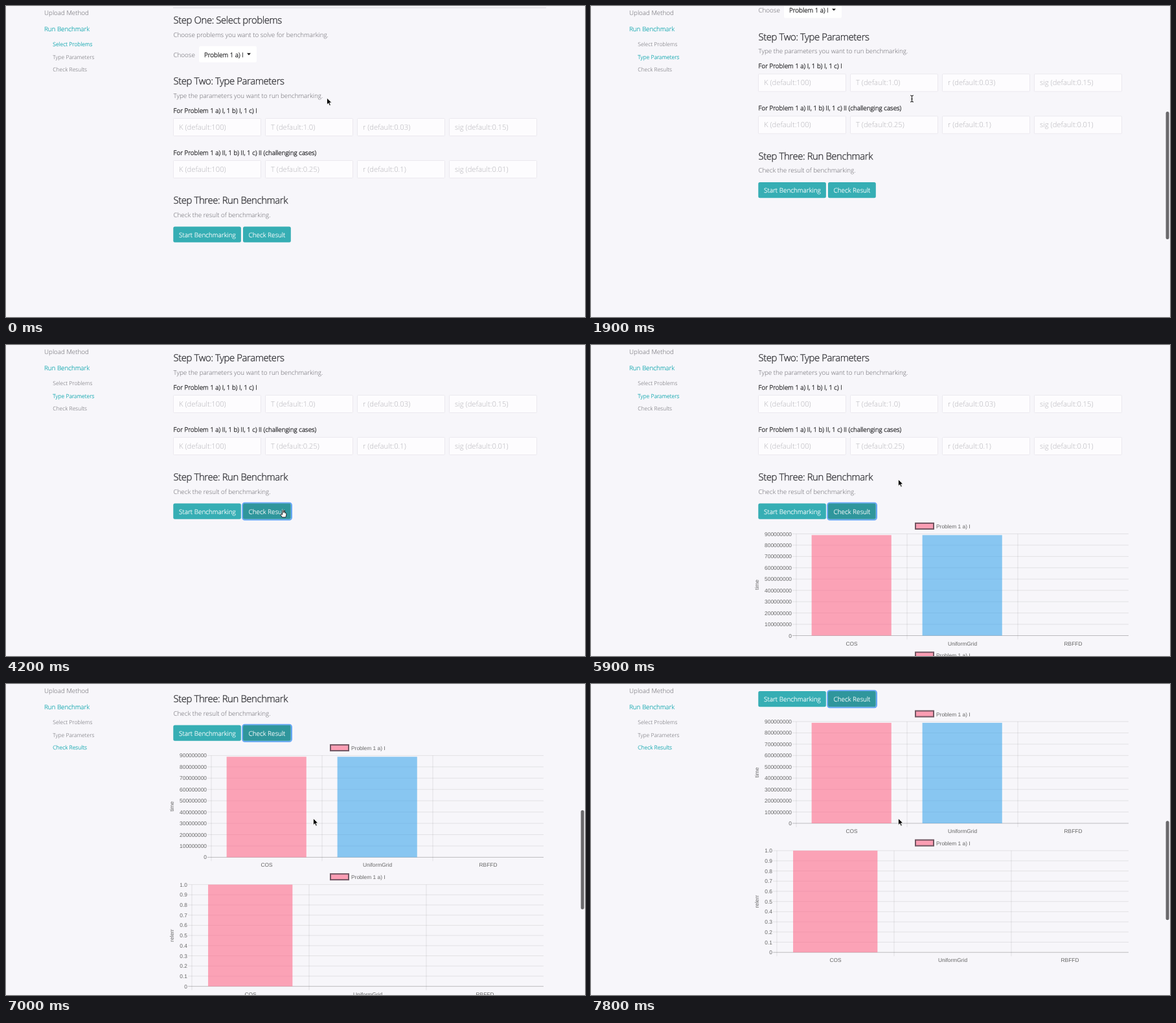
Animation, 894 px wide and 480 px high, one loop 8 s. Source, as an HTML page:

```html
<!DOCTYPE html>
<html lang="en">
<head>
<meta charset="utf-8">
<title>Run Benchmark</title>
<style>
  html, body { margin: 0; width: 100%; height: 100%; overflow: hidden; background: #f7f6fa; }
  svg { display: block; }
  text { font: 300 9.8px "Open Sans", sans-serif; fill: #626167; white-space: pre; text-rendering: geometricPrecision; }
  .head { font-size: 14.9px; letter-spacing: -.39px; fill: #2c2c30; stroke: #2c2c30; stroke-width: .3px; }
  .label { fill: #1a1a1c; stroke: #1a1a1c; stroke-width: .28px; }
  .hint { font-size: 11.25px; fill: #b6b5ba; }
  .sub { font-size: 8.5px; }
  .white { font-size: 9.93px; fill: #fff; stroke: #fff; stroke-width: .2px; }
  .on { fill: #1eabb3; stroke: #1eabb3; stroke-width: .2px; }
  .chart text { font: 400 8.4px "Liberation Sans", Arial, sans-serif; fill: #666; }
  .mid { text-anchor: middle; }
  .end { text-anchor: end; }
</style>
</head>
<body>
<svg id="stage" width="894" height="480" viewBox="0 0 894 480"></svg>
<script>
const PINK = '#ff6384', BLUE = '#36a2eb';
const text = (x, y, str, cls = '', extra = '') => `<text x="${x}" y="${y}" class="${cls}" ${extra}>${str}</text>`;
const rect = (x, y, w, h, fill, extra = '') =>
  `<rect x="${x}" y="${y}" width="${w}" height="${h}" fill="${fill}" ${extra}/>`;
const line = (x1, y1, x2, y2, alpha = .11) =>
  `<path d="M${x1} ${y1}L${x2} ${y2}" stroke="#000" stroke-opacity="${alpha}" stroke-width=".8"/>`;

const inputs = (y, hints) => hints.map((hint, i) =>
  rect(258.5 + i * 142, y + .5, 135, 27, '#fdfcfe', 'stroke="#ebe9ef" rx="1"') +
  text(267 + i * 142, y + 18, hint, 'hint')).join('');

const section = (y, title, note) => text(258.5, y, title, 'head') + text(258.5, y + 20.4, note);

// Bar chart whose plot area spans left..830 and top..top+157
function chart(top, left, ticks, title, bars) {
  const bottom = top + 157, step = (830 - left) / 3;
  let out = rect(501, top - 16.5, 28, 9, PINK, 'fill-opacity=".6" stroke="#735763" stroke-width="2"') +
    text(533, top - 8.5, 'Problem 1 a) I') +
    text(0, 0, title, 'mid', `transform="translate(258.5 ${top + 78.5}) rotate(-90)"`);
  ticks.forEach((tick, i) => {
    const y = top + i * 157 / (ticks.length - 1);
    out += line(left - 6, y, 830, y, tick === '0' ? .3 : .11) + text(left - 7, y + 3, tick, 'end');
  });
  ['COS', 'UniformGrid', 'RBFFD'].forEach((name, i) => {
    const x = left + i * step;
    out += line(x, top, x, bottom + 6) + text(x + step / 2, bottom + 15, name, 'mid');
    if (bars[i]) out += rect(x + step * .14 - .3, bottom, step * .72, 0, [PINK, BLUE][i],
      `fill-opacity=".57" class="bar" data-bottom="${bottom}" data-full="${bars[i] * 157}"`);
  });
  return out;
}

const millions = Array.from({ length: 10 }, (_, i) => i < 9 ? (9 - i) + '00000000' : '0');
const tenths = Array.from({ length: 11 }, (_, i) => i < 10 ? (1 - i / 10).toFixed(1) : '0');

stage.innerHTML = `
  ${rect(0, 0, 894, 480, '#f7f6fa')}
  ${text(59, 14, 'Upload Method')}${text(59, 39.2, 'Run Benchmark', 'on')}
  ${['Select Problems', 'Type Parameters', 'Check Results'].map((s, i) => text(72.3, 62.2 + i * 19.6, s, 'sub nav')).join('')}
  <g id="page">
    ${rect(258, 2.3, 576, 1, '#d8d6dc')}
    ${section(27.3, 'Step One: Select problems', 'Choose problems you want to solve for benchmarking.')}
    ${text(258.5, 78.5, 'Choose')}
    ${rect(298, 62, 89, 25, '#fff', 'rx="2.5"')}${text(306, 78.5, 'Problem 1 a) I', 'label')}
    <path d="M372 72.7h6l-3 3.2z" fill="#111"/>
    ${section(121.2, 'Step Two: Type Parameters', 'Type the parameters you want to run benchmarking.')}
    ${text(258.5, 165, 'For Problem 1 a) I, 1 b) I, 1 c) I', 'label')}
    ${inputs(173, ['K (default:100)', 'T (default:1.0)', 'r (default:0.03)', 'sig (default:0.15)'])}
    ${text(258.5, 230, 'For Problem 1 a) II, 1 b) II, 1 c) II (challenging cases)', 'label')}
    ${inputs(238, ['K (default:100)', 'T (default:0.25)', 'r (default:0.1)', 'sig (default:0.01)'])}
    ${section(305.3, 'Step Three: Run Benchmark', 'Check the result of benchmarking.')}
    ${rect(258.3, 340.5, 104.6, 24.2, '#36aeb4', 'rx="2.5"')}${text(267, 356.6, 'Start Benchmarking', 'white')}
    ${rect(365.2, 339.7, 75.8, 26.1, 'none', 'id="ring" rx="3.5" stroke="#64a6f6" stroke-width="2"')}
    ${rect(366, 340.5, 73.8, 24.2, '#36aeb4', 'id="check" rx="2.5"')}${text(374.5, 356.6, 'Check Result', 'white')}
    <g id="charts" class="chart">
      ${chart(387.5, 317, millions, 'time', [.988, .988])}
      ${chart(586.7, 287, tenths, 'relerr', [1])}
    </g>
  </g>
  ${rect(887.6, 0, 5, 0, '#6a696c', 'id="thumb" rx="2.5"')}
  <g id="cursor">
    <path d="M0 0V10.2L2.4 8L4 11.7L5.8 10.9L4.2 7.3H7.4Z" fill="#000" stroke="#fff" stroke-width=".8"/>
    <path d="M-2.5-4Q0-4 0-2.5Q0-4 2.5-4M0-2.5V4.5M-2.5 6Q0 6 0 4.5Q0 6 2.5 6M-1.2 1.5H1.2" fill="none" stroke="#222" stroke-width="1.1"/>
    <path d="M-.9 1Q0-.6.9 1V4.4Q2-.1 3 .9 2.6 4.2 3.2 4.8L4.2 4.6Q5.3 4.4 5.3 6V8Q5 10 4.2 11.4H-1.2Q-2 9.5-3.8 7.4-3.6 5.6-.9 7.2Z" fill="#fff" stroke="#111" stroke-width=".9" stroke-linejoin="round"/>
  </g>`;

const { page, ring, check, charts, thumb, cursor } = Object.fromEntries(
  [...document.querySelectorAll('[id]')].map(el => [el.id, el]));
const navs = document.querySelectorAll('.nav'), bars = document.querySelectorAll('.bar');
const show = (el, on) => el.setAttribute('visibility', on ? 'visible' : 'hidden');
const clamp = v => Math.min(1, Math.max(0, v));
const smooth = v => v * v * (3 - 2 * v);
const linear = v => v;

// Value at time t of a track of [time, value] points
function track(points, t, ease = linear) {
  let value = points[0][1];
  for (let i = 1; i < points.length; i++) {
    const [t0, v0] = points[i - 1], [t1, v1] = points[i];
    value += (v1 - v0) * ease(clamp((t - t0) / (t1 - t0)));
  }
  return value;
}

const SCROLL = [[1150, 0], [1900, 68.5], [2350, 96], [5950, 96], [6400, 226.5], [7000, 277], [7800, 329.5]];
const CURSOR_X = [[2650, 495.5], [3350, 427.5], [4950, 427.5], [5500, 474.5]];
const CURSOR_Y = [[2650, 142], [3350, 254.5], [4950, 254.5], [5500, 207.5]];
const HOVER = 3280, CLICK = 3700, LOADED = 4800;

function draw(t) {
  const scroll = track(SCROLL, t);
  page.setAttribute('transform', `translate(0 ${-scroll})`);
  const active = scroll > 240 ? 2 : scroll > 56 ? 1 : 0;
  navs.forEach((nav, i) => nav.classList.toggle('on', i === active));

  show(ring, t >= CLICK);
  check.setAttribute('fill', t >= HOVER ? '#2f969c' : '#36aeb4');
  show(charts, t >= LOADED);
  const grow = 1 - (1 - clamp((t - LOADED) / 1000)) ** 4;
  bars.forEach(bar => {
    const h = bar.dataset.full * grow;
    bar.setAttribute('y', bar.dataset.bottom - h);
    bar.setAttribute('height', h);
  });

  const long = t >= LOADED;
  thumb.setAttribute('y', long ? 179 + .313 * (scroll - 226.5) : 163 + .41 * (scroll - 68.5));
  thumb.setAttribute('height', long ? 153 : 197);
  thumb.setAttribute('opacity', long ? +(t > 5950) : t < 1150 ? 0 : 1 - clamp((t - 2700) / 250));

  const x = track(CURSOR_X, t, smooth), y = track(CURSOR_Y, t, smooth);
  cursor.setAttribute('transform', `translate(${x} ${y})`);
  const kind = y > 245 && x < 440 ? 2 : t > 1200 && y < 170 ? 1 : 0;
  [...cursor.children].forEach((shape, i) => show(shape, i === kind));
}

function frame() {
  draw(performance.now() % 8000);
  requestAnimationFrame(frame);
}
frame();
</script>
</body>
</html>
```
